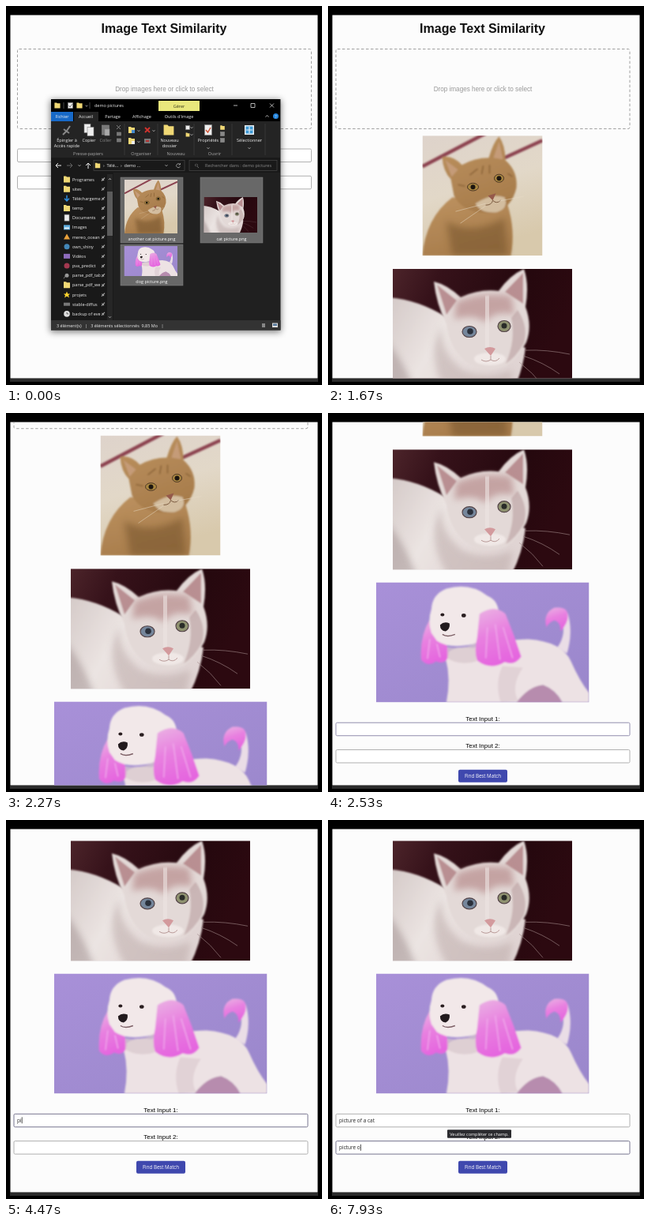
An HTML page that plays this animation: 400x480 px, repeating every 8000 ms.

```html
<!DOCTYPE html>
<html lang="en">
<head>
<meta charset="utf-8">
<title>Image Text Similarity</title>
<style>
html, body { margin: 0; width: 100%; height: 100%; overflow: hidden; background: #000; }
svg { display: block; width: 400px; height: 480px; }
text { white-space: pre; }
.arial { font-family: "Liberation Sans", Arial, sans-serif; font-size: 8px; }
.ui { font-family: "Open Sans", "Noto Sans", sans-serif; font-size: 5.5px; font-weight: 500; fill: #f0f0f0; }
.mid { text-anchor: middle; }
.field { fill: #fff; stroke: #b0b0b0; stroke-width: 1; }
.field.hover { stroke: #938fae; }
.field.focus { stroke: #77758f; }
.typed { font-size: 6.5px; fill: #222; }
</style>
</head>
<body>
<svg viewBox="0 0 400 480">
<defs>
  <clipPath id="viewport"><rect x="5.500" y="11.500" width="389" height="460"/></clipPath>
  <filter id="soft" x="-20%" y="-20%" width="140%" height="140%"><feGaussianBlur stdDeviation="1.2"/></filter>
  <filter id="fuzzy" x="-30%" y="-30%" width="160%" height="160%"><feGaussianBlur stdDeviation="4.500"/></filter>
  <filter id="shadow" x="-10%" y="-10%" width="120%" height="120%"><feGaussianBlur stdDeviation="4"/></filter>
  <linearGradient id="snow" x2=".3" y2="1"><stop stop-color="#ded3cb"/><stop offset=".5" stop-color="#e2d8c8"/><stop offset="1" stop-color="#d8c9ac"/></linearGradient>
  <linearGradient id="ginger" x2=".4" y2="1"><stop stop-color="#bd9260"/><stop offset="1" stop-color="#a87d4c"/></linearGradient>
  <linearGradient id="night" x2="1" y2=".3"><stop stop-color="#4c242a"/><stop offset=".25" stop-color="#36121a"/><stop offset=".7" stop-color="#25080e"/><stop offset="1" stop-color="#2c0910"/></linearGradient>
  <linearGradient id="fur" x2="1" y2=".4"><stop stop-color="#d3c8c6"/><stop offset=".45" stop-color="#ebe4e2"/><stop offset="1" stop-color="#e0d4d3"/></linearGradient>
  <linearGradient id="lilac" x2="1" y2="1"><stop stop-color="#a890d8"/><stop offset="1" stop-color="#9a87cb"/></linearGradient>
  <linearGradient id="pink" x2=".3" y2="1"><stop stop-color="#eab4e3"/><stop offset=".5" stop-color="#e880e0"/><stop offset="1" stop-color="#e566df"/></linearGradient>

  <symbol id="ginger-cat" viewBox="0 0 152 152" preserveAspectRatio="none">
    <rect width="152" height="152" fill="url(#snow)"/>
    <g filter="url(#soft)">
      <path d="M0 39L80 -3M104 28L152 6" stroke="#8c4350" stroke-width="4.500"/>
      <path d="M0 152Q4 104 38 78L108 88Q118 120 112 152Z" fill="url(#ginger)"/>
      <path d="M30 108Q62 128 104 104L108 152H38Z" fill="#79572f" opacity=".6" filter="url(#fuzzy)"/>
      <path d="M25 27Q38 24 50 37Q66 28 84 28Q90 8 97 1Q105 12 105 31Q121 45 119 66Q113 92 90 98Q52 100 40 76L36 55Q26 45 25 27Z" fill="url(#ginger)"/>
      <path d="M29 31L45 43L37 52ZM90 28L97 7L102 30Z" fill="#c59b78"/>
      <path d="M67 86Q88 72 104 78Q110 92 94 97Q74 99 67 86Z" fill="#d3bd9f"/>
      <path d="M60 50L70 42M75 49L77 38M85 48L85 37M45 62L54 64M108 48L114 52" stroke="#8a6237" stroke-width="1.600"/>
    </g>
    <g fill="#a98640" stroke="#4a3524"><ellipse cx="64" cy="65" rx="7" ry="4.800"/><ellipse cx="97" cy="54" rx="6" ry="5"/></g>
    <circle cx="64" cy="65" r="3" fill="#1c150f"/><circle cx="97" cy="54" r="3" fill="#1c150f"/>
    <path d="M83 76L93 73L89 82Z" fill="#95594a"/>
    <path d="M89 82Q88 88 80 88M89 82Q94 87 99 82" stroke="#7b5a40" fill="none"/>
    <path d="M80 86L42 96M80 89L48 111M96 83L128 77" stroke="#e6dac6" stroke-width=".5"/>
  </symbol>

  <symbol id="white-cat" viewBox="0 0 227 152" preserveAspectRatio="none">
    <rect width="227" height="152" fill="url(#night)"/>
    <path d="M-8 36Q30 38 66 60L168 100Q164 134 148 162H-8Z" fill="url(#fur)" filter="url(#soft)"/>
    <path d="M62 72Q58 104 88 128Q120 142 152 128L146 160H70Q40 110 62 72Z" fill="#b9a7a6" opacity=".5" filter="url(#fuzzy)"/>
    <path d="M-8 92Q12 112 30 160H-8Z" fill="#9c8c8c" opacity=".5" filter="url(#fuzzy)"/>
    <g filter="url(#soft)">
      <path d="M52 16Q69 20 86 36Q110 25 134 28Q148 8 166 0Q173 20 168 48Q177 72 169 93Q158 114 143 123Q119 133 96 120Q72 103 68 70Q55 44 52 16Z" fill="#e3d9d7"/>
      <path d="M56 20L81 40L68 58ZM142 29L165 5L165 44Z" fill="#b98f92"/>
      <path d="M158 52Q172 72 166 94Q156 112 143 120Q156 90 150 62Z" fill="#c0a9a8" opacity=".7"/>
    </g>
    <path d="M80 42Q110 28 150 34L154 58Q128 52 117 68Q104 56 78 64Z" fill="#b88d8d" opacity=".7" filter="url(#fuzzy)"/>
    <path d="M118 34L121 100" stroke="#eee5e3" stroke-width="10" opacity=".6" filter="url(#soft)"/>
    <ellipse cx="123" cy="114" rx="20" ry="8" fill="#f0e8e6" filter="url(#soft)"/>
    <g stroke="#544448" stroke-width="1.200"><ellipse cx="97" cy="79.500" rx="9" ry="7" fill="#75869b"/><ellipse cx="141" cy="72.500" rx="8" ry="7" fill="#8f9270"/></g>
    <circle cx="98" cy="79" r="3.800" fill="#2a303b"/><circle cx="141" cy="72" r="3.500" fill="#2a2c28"/>
    <path d="M116 101Q123 97 130 101L124 110Z" fill="#d39a9d"/>
    <path d="M124 110V115Q118 119 112 115M124 115Q130 119 135 113" stroke="#b99a98" fill="none"/>
    <path d="M168 103Q195 102 224 108M165 110Q190 118 211 133M160 118Q178 132 190 148" stroke="#a38c8c" stroke-width=".6" fill="none"/>
  </symbol>

  <symbol id="poodle" viewBox="0 0 270 152" preserveAspectRatio="none">
    <rect width="270" height="152" fill="url(#lilac)"/>
    <g filter="url(#soft)">
      <path d="M88 96Q91 79 123 83Q165 72 193 72Q236 75 247 100Q258 125 270 140V152H236Q228 136 211 130Q192 140 182 152H89Q95 122 88 96Z" fill="#ede2e4"/>
      <path d="M178 152Q194 131 212 130Q228 136 236 152Z" fill="#b78cae"/>
      <path d="M186 108Q170 132 180 150L158 152Q150 128 160 106Z" fill="#d6c4ca" opacity=".5"/>
      <path d="M230 82Q242 66 235 42L243 39Q250 63 242 90Z" fill="#eadde6"/>
      <path d="M216 57Q211 39 226 32Q243 30 243 42Q244 50 234 62Q234 50 226 48Q218 51 216 57Z" fill="url(#pink)"/>
      <path d="M68 47Q55 68 57 98Q66 108 76 100Q90 106 92 90Q88 66 68 47Z" fill="url(#pink)"/>
      <path d="M70 64Q65 49 70 34Q71 15 89 8Q119 0 141 17Q158 24 155 47Q151 71 124 78Q93 85 77 74Z" fill="#f2e8e9"/>
      <path d="M90 82Q110 86 127 76V100Q106 106 90 96Z" fill="#d9c8cc" opacity=".7"/>
      <path d="M131 40Q150 27 164 40Q175 66 184 94Q176 106 163 101Q145 112 128 99Q124 86 128 70Z" fill="url(#pink)"/>
      <path d="M141 57L139 96M151 53L157 98M161 57L173 96M68 72L65 97M77 78L81 95" stroke="#f1b0ec" stroke-width="1.200"/>
    </g>
    <ellipse cx="84" cy="41" rx="2.500" ry="2" fill="#2a1e20"/><ellipse cx="111" cy="42" rx="2.800" ry="2.300" fill="#2a1e20"/>
    <path d="M81 54Q86 49 93 52Q94 59 88 62Q81 61 81 54Z" fill="#221a1d"/>
    <path d="M84 66Q90 70 100 66" stroke="#7d6066" stroke-width="1.500" fill="none"/>
  </symbol>
</defs>

<rect width="400" height="480"/>
<rect x="5" y="472" width="390" height="4" fill="#2c2c2c"/>
<g clip-path="url(#viewport)">
  <rect x="5" y="11" width="390" height="461" fill="#fcfcfc"/>
  <g id="page">
    <text class="arial mid" x="200" y="34" style="font-size:16px;font-weight:bold" fill="#111">Image Text Similarity</text>
    <rect x="14.500" y="54.500" width="372" height="101" rx="2" fill="none" stroke="#a0a0a0" stroke-dasharray="3.500 2.500"/>
    <text class="arial mid" x="200.500" y="108" style="font-size:8.15px" fill="#999">Drop images here or click to select</text>
    <g id="photos">
      <use href="#ginger-cat" x="124" y="164.200" width="152" height="152"/>
      <use href="#white-cat" x="86.500" y="333" width="227" height="152"/>
      <use href="#poodle" x="65.500" y="501.200" width="269.500" height="152"/>
    </g>
    <g id="form">
      <text class="arial mid" x="200.500" y="-2">Text Input 1:</text>
      <rect id="field1" class="field" x="14.500" y=".5" width="372" height="16.500" rx="1.500"/>
      <text class="arial mid" x="200.500" y="32.500">Text Input 2:</text>
      <rect id="field2" class="field" x="14.500" y="34.800" width="372" height="16.500" rx="1.500"/>
      <text id="typed1" class="ui typed" x="18.500" y="11"/>
      <text id="typed2" class="ui typed" x="18.500" y="45.500"/>
      <rect id="caret" width=".7" height="8" fill="#111"/>
      <rect x="169.500" y="60" width="62" height="16" rx="2" fill="#3f48ae"/>
      <text class="ui mid" x="200.500" y="70.300" style="font-size:6.2px;fill:#fff">Find Best Match</text>
    </g>
  </g>
</g>
<g id="tooltip">
  <rect x="151" y="392.300" width="81" height="10.500" rx="1" fill="#2b2b2f"/>
  <text class="ui mid" x="191.500" y="399.600" style="fill:#fff">Veuillez compléter ce champ.</text>
</g>
<g id="explorer"></g>
</svg>
<script>
const $ = id => document.getElementById(id);
const rect = (x, y, w, h, fill, extra = '') => `<rect x="${x}" y="${y}" width="${w}" height="${h}" fill="${fill}" ${extra}/>`;
const label = (x, y, s, fill = '#f0f0f0', mid = true) =>
  `<text class="ui ${mid ? 'mid' : ''}" x="${x}" y="${y}" style="fill:${fill}">${s}</text>`;
const line = (d, color = '#ddd', w = .8) => `<path d="${d}" fill="none" stroke="${color}" stroke-width="${w}"/>`;
const folder = (x, y, s = 1) =>
  `<path transform="translate(${x} ${y}) scale(${s})" d="M-4 -4H-1L0 -3H4V4H-4Z" fill="#f0d875"/>`;
const sheet = (x, y, w = 8, h = 11, fill = '#eee') => rect(x - w / 2, y - h / 2, w, h, fill, 'stroke="#888" stroke-width=".6"');
const chevron = (x, y, color = '#bbb') => line(`M${x - 1.5} ${y - .8}L${x} ${y + .8}L${x + 1.5} ${y - .8}`, color);
const dot = (x, y, r, fill) => `<circle cx="${x}" cy="${y}" r="${r}" fill="${fill}"/>`;
const pin = (x, y) => line(`M${x - 2} ${y + 2}L${x} ${y}M${x - 1.5} ${y - 1}L${x + 1} ${y + 1.5}M${x} ${y}L${x + 2} ${y - 2}`, '#aaa', 1.1);

function titleBar() {
  return rect(57, 118, 290, 28, '#000') + rect(193, 120, 52, 13, '#e9e77c') + label(219, 129, 'Gérer', '#37371a') +
    folder(65, 126, .9) + line('M73 122V130M106 122V130', '#777', .6) + sheet(81.5, 126, 6, 7) +
    line('M79.500 126L81 128L84 124', '#555') + folder(93, 126, .9) + chevron(102, 126.5) +
    label(112, 128.2, 'demo pictures', '#eee', false) +
    line('M288 126H293M310 123.500H315V128.500H310ZM334 123.500L339 128.500M339 123.500L334 128.500') +
    rect(57, 134, 28, 12, '#1769c8') + rect(86, 134, 31, 12, '#252525') +
    [[71, 'Fichier'], [101, 'Accueil'], [135, 'Partage'], [172, 'Affichage'], [219, "Outils d'image"]]
      .map(([x, s]) => label(x, 142, s)).join('') +
    line('M328.500 140.500L330.500 138.500L332.500 140.500') + dot(341.5, 139.5, 3.5, '#2384dc') + label(341.5, 141.5, '?');
}

function ribbon() {
  const captions = [[77, 172, 'Épingler à'], [77, 179, 'Accès rapide'], [105, 172, 'Copier'], [207, 172, 'Nouveau'],
    [207, 179, 'dossier'], [256, 172, 'Propriétés'], [308, 172, 'Sélectionner']];
  const groups = [[104, 'Presse-papiers'], [171, 'Organiser'], [215, 'Nouveau'], [264, 'Ouvrir']];
  return rect(57, 146, 290, 46, '#242424') +
    captions.map(([x, y, s]) => label(x, y, s)).join('') + label(126, 172, 'Coller', '#888') +
    groups.map(([x, s]) => label(x, 189, s, '#aaa')).join('') +
    [150, 192, 238, 286, 328].map(x => line(`M${x} 149V189`, '#444', .6)).join('') +
    line('M72 163L77 158M73 156L80 161M77 158L81 152', '#888', 2) +
    sheet(103, 155) + sheet(107, 159) + sheet(126, 157, 9, 12, '#777') + sheet(128, 160, 6, 8, '#aaa') +
    line('M140 151L145 156M145 151L140 156', '#999') + sheet(143, 162, 5, 4, '#777') + sheet(143, 170, 5, 4, '#777') +
    folder(159, 157) + rect(159, 157, 4, 4, '#448bd0') + folder(159, 171) + rect(159, 171, 4, 4, '#eee') +
    line('M176 154L182 160M182 154L176 160', '#d2332e', 1.8) + rect(175, 168, 8, 6, '#777') + rect(177, 170, 4, 2, '#b73434') +
    chevron(168, 158) + chevron(168, 172) + chevron(187, 158) +
    folder(206, 157, 1.6) + sheet(230, 154, 5, 5) + folder(230, 163, .6) + chevron(235, 154) + chevron(235, 163) +
    sheet(256, 157, 9, 13) + line('M253 157L255.500 160L259 154', '#d05030', 1.4) +
    folder(274, 154, .7) + sheet(274, 162, 5, 5, '#888') + sheet(274, 170, 5, 5, '#888') +
    rect(302, 151, 12, 12, '#e7edf2') + rect(303.5, 152.5, 9, 9, '#3d9ad6') + line('M308 153V161M304 157H312', '#e7edf2', 1.2) +
    chevron(256, 180) + chevron(308, 180);
}

function addressBar() {
  const box = (x, w) => rect(x, 195.5, w, 13, '#191919', 'stroke="#484848" stroke-width=".7"');
  return rect(57, 192, 290, 19, '#191919') +
    line('M70 202H63L66 199M63 202L66 205M104 206V199L101 202M104 199L107 202', '#eee', 1) +
    line('M77 202H84L81 199M84 202L81 205', '#777') + chevron(93, 202) + box(111, 115) + box(232, 111) +
    folder(116, 202, .8) + label(123, 204, '›  Télé...  ›  demo ...', '#f0f0f0', false) + chevron(203, 202) +
    line('M220 200.500A2.500 2.500 0 1 0 220.500 203M220.500 199V201H218.500', '#bbb', .7) +
    dot(241, 201.5, 1.8, '#777') + dot(241, 201.5, 1.2, '#191919') + line('M242 203L244 205', '#777') +
    label(252, 204, 'Rechercher dans : demo pictures', '#8c8c8c', false);
}

function navPane() {
  const names = ['Programes', 'sites', 'Téléchargeme', 'temp', 'Documents', 'Images', 'mereo_ocean', 'own_shiny',
    'Vidéos', 'pva_predict', 'parse_pdf_tab', 'parse_pdf_we', 'projets', 'stable-diffus', 'backup of eve'];
  const icons = {
    2: y => line(`M77 ${y - 4}V${y + 3}M74 ${y}L77 ${y + 3}L80 ${y}`, '#2f8fe0', 1.5),
    4: y => sheet(77, y, 6, 8), 5: y => rect(73, y - 3, 8, 6, '#5faee0') + rect(74, y, 6, 2, '#e4eef5'),
    6: y => `<path d="M77 ${y - 4}L81 ${y + 3}H73Z" fill="#e9a13b"/>`,
    7: y => dot(77, y, 3.5, '#4387b8'), 8: y => rect(73, y - 3, 8, 6, '#8d6bbb'),
    9: y => dot(77, y, 3.5, '#a33850'), 10: y => dot(77, y, 2.5, '#999') + line(`M75 ${y + 1}L73 ${y + 4}`, '#999'),
    12: y => `<path d="M77 ${y - 4}L78.200 ${y - 1}H81L79 ${y + 1}L80 ${y + 4}L77 ${y + 2}L74 ${y + 4}L75 ${y + 1}L73 ${y - 1}H75.800Z" fill="#ffd52e"/>`,
    13: y => rect(73, y - 2, 8, 4, '#777'), 14: y => dot(77, y, 3.8, '#ddd') + line(`M77 ${y - 2}V${y}H79`, '#444')
  };
  const rows = names.map((name, i) => {
    const y = 219.5 + i * 12.17;
    return (icons[i] ? icons[i](y) : folder(77, y)) + label(84, y + 2, name, '#f0f0f0', false) +
      rect(119.5, y - 5, 8, 10, '#191919') + pin(123, y);
  });
  return rect(57, 211, 79, 187, '#191919') + rows.join('') + rect(128, 213, 7, 185, '#262626') +
    rect(128, 235, 7, 56, '#5a5a5a') + line('M130 220L131.500 218.500L133 220') + chevron(131.5, 394);
}

function files() {
  const tile = (x, y, h, id, ix, iy, iw, ih, name) => rect(x, y, 79, h, '#686868', 'stroke="#858585" stroke-width=".5"') +
    `<use href="#${id}" x="${ix}" y="${iy}" width="${iw}" height="${ih}"/>` + label(x + 39.5, y + h - 3.2, name, '#fff');
  return tile(145, 217, 83, 'ginger-cat', 150, 220, 67, 68, 'another cat picture.png') +
    tile(246, 217, 83, 'white-cat', 250.5, 242, 67.5, 45, 'cat picture.png') +
    tile(145, 302, 52, 'poodle', 149.5, 304, 67.5, 38, 'dog picture.png');
}

$('explorer').innerHTML =
  rect(56, 119, 292, 294, '#000', 'opacity=".5" filter="url(#shadow)"') + rect(57, 118, 290.5, 292.5, '#202020') +
  titleBar() + ribbon() + addressBar() + navPane() + files() + rect(57, 398, 290.5, 12.5, '#333') +
  label(64, 406.5, '3 élément(s)   |   3 éléments sélectionnés  9,85 Mo   |', '#f0f0f0', false) +
  line('M325 402V407M327 402V407', '#ddd', 1) + rect(337, 401.5, 7, 5.5, '#ddd') + rect(338, 402.5, 5, 2.5, '#55789c');

const LOOP = 8000, DROP = 670, CLOSE = 1400, HOVER = 2500, FOCUS1 = 4130, TOOLTIP = 4670, FOCUS2 = 6530;
const SCROLL = [[2000, 0], [2130, 53.7], [2530, 286.5], [2600, 306.7]];
const PHRASE = 'picture of a cat';
const KEYS1 = [4270, 4400, 4530, 4670, 4870, 5070, 5130, 5200, 5270, 5400, 5470, 5530, 5670, 5800, 5870, 6000];
const KEYS2 = [6930, 7070, 7270, 7330, 7470, 7670, 7730, 7870, 7930];

function track(steps, t) {
  if (t <= steps[0][0]) return steps[0][1];
  for (let i = 1; i < steps.length; i++) {
    const [t0, a] = steps[i - 1], [t1, b] = steps[i];
    if (t < t1) return a + (b - a) * (t - t0) / (t1 - t0);
  }
  return steps.at(-1)[1];
}
const typed = (keys, t) => PHRASE.slice(0, keys.filter(k => k <= t).length);
const show = (id, on) => $(id).setAttribute('visibility', on ? 'visible' : 'hidden');

function render(t) {
  const dropped = t >= DROP, second = t >= FOCUS2;
  $('page').setAttribute('transform', `translate(${dropped ? -4.5 : 0} ${-track(SCROLL, t)})`);
  $('form').setAttribute('transform', `translate(0 ${dropped ? 678.5 : 180.5})`);
  show('photos', dropped);
  show('explorer', t < CLOSE);
  show('tooltip', t >= TOOLTIP);
  $('field1').setAttribute('class', 'field' + (second || t < HOVER ? '' : t < FOCUS1 ? ' hover' : ' focus'));
  $('field2').setAttribute('class', 'field' + (second ? ' focus' : ''));
  $('typed1').textContent = typed(KEYS1, t);
  $('typed2').textContent = typed(KEYS2, t);
  const active = $(second ? 'typed2' : 'typed1');
  const width = active.textContent ? active.getComputedTextLength() : 0;
  $('caret').setAttribute('x', 18.7 + width);
  $('caret').setAttribute('y', second ? 39 : 4.5);
  show('caret', t >= FOCUS1);
}

const start = performance.now();
function tick() {
  render((performance.now() - start) % LOOP);
  requestAnimationFrame(tick);
}
tick();
</script>
</body>
</html>
```
